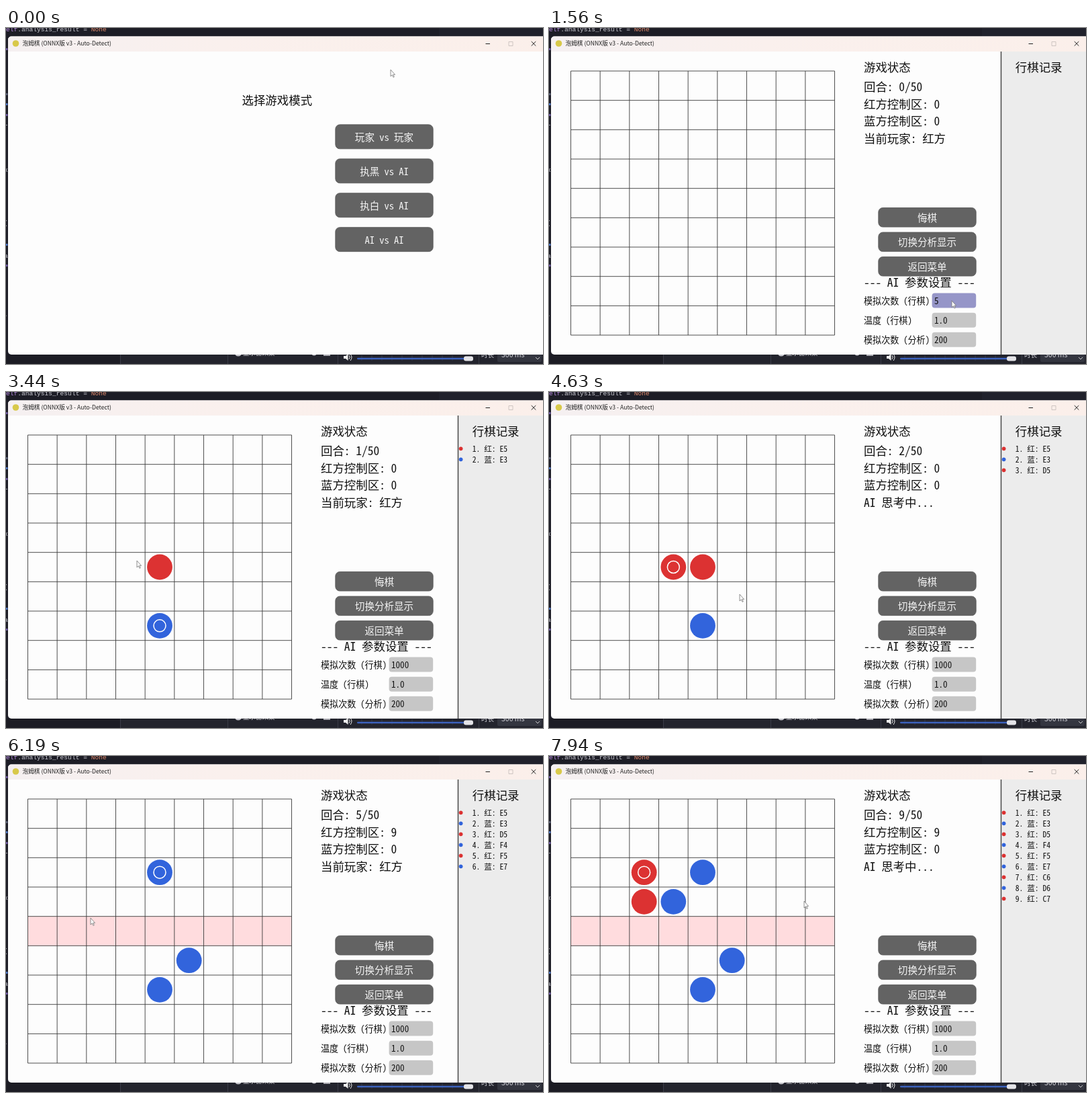
An HTML page for the animation above (8000 ms loop, 800 px wide and 500 px high).

```html
<!DOCTYPE html>
<html lang="zh-CN">
<head>
<meta charset="utf-8">
<style>
  html, body { margin: 0; width: 100%; height: 100%; overflow: hidden; background: #1c1c24; }
  svg { display: block; width: 800px; height: 500px; }
  text { font-family: "Noto Sans Mono CJK SC", "Noto Sans CJK SC", monospace; white-space: pre; }
  .ui { font-family: "Noto Sans CJK SC", "Noto Sans", sans-serif; }
  .code { font-family: "Liberation Mono", monospace; }
</style>
</head>
<body>
<svg id="stage" viewBox="0 0 800 500">
  <defs>
    <linearGradient id="bar"><stop stop-color="#f5f0f1"/><stop offset=".4" stop-color="#faf0ed"/><stop offset="1" stop-color="#fbefea"/></linearGradient>
    <clipPath id="win"><rect x="3" y="12.5" width="820" height="473.5" rx="5"/></clipPath>
  </defs>
  <g id="desktop"></g>
  <g clip-path="url(#win)">
    <rect x="3" y="12" width="800" height="475" fill="#fdfdfd"/>
    <rect x="3" y="12" width="800" height="23" fill="url(#bar)"/>
    <g id="caption"></g>
    <g id="menu"></g>
    <g id="game"><g id="fixed"></g><g id="live"></g></g>
  </g>
  <path id="cursor" d="M0 0V10L2.3 7.9L4 11.4L5.4 10.7L3.8 7.4H6.6Z" fill="#fbfbfb" stroke="#777" stroke-width=".8"/>
</svg>
<script>
const LOOP = 8000, CELL = 43.67, LEFT = 32.5, TOP = 64;
const RED = '#dc3232', BLUE = '#3264dc';
const $ = id => document.getElementById(id);

const rect = (x, y, w, h, fill, rx = 0, extra = '') =>
  `<rect x="${x}" y="${y}" width="${w}" height="${h}" rx="${rx}" fill="${fill}" ${extra}/>`;
const circle = (x, y, r, fill, extra = '') =>
  `<circle cx="${x}" cy="${y}" r="${r}" fill="${fill}" ${extra}/>`;
const path = (d, stroke, w = 1) => `<path d="${d}" fill="none" stroke="${stroke}" stroke-width="${w}"/>`;
// y is the vertical middle of the line
const text = (s, x, y, size, fill = '#111', extra = '') =>
  `<text x="${x}" y="${y + size * .37}" font-size="${size}" fill="${fill}" ${extra}>${s}</text>`;
const button = (s, y, h) =>
  rect(490.8, y, 145.4, h, '#636363', 6.5, 'stroke="#565656" stroke-width=".8"') +
  text(s, 563.5, y + h / 2 + .8, 14.55, '#f4f4f4', 'text-anchor="middle"');

function drawDesktop() {
  const ui = 'class="ui"', code = 'class="code"';
  let s = rect(0, 0, 800, 500, '#1d1d26') + rect(645, 0, 155, 13, '#20212b') +
    rect(0, 486, 800, 14, '#23242d') + rect(0, 486, 170, 14, '#1c1c24') +
    text('<tspan fill="#b78be0">elf</tspan>.analysis_result = <tspan fill="#e08a6c">None</tspan>', 0, 1.2, 9.6, '#c8c8d0', code);
  for (const [y, c] of [[30, '#6b559e'], [97, '#555a70'], [112, '#4a72c0'], [128, '#6b559e'], [321, '#4a72c0'], [352, '#6b559e']])
    s += rect(0, y, 2.5, 3, c);
  for (const [ch, y] of [['r', 145], ['x', 210], ['(', 289], ['a', 338], ['.', 425]])
    s += text(ch, -3, y, 9.6, '#c8c8d0', code);
  for (const x of [170.5, 330.5, 494.5, 704.5]) s += path(`M${x} 486V500`, '#3a3c48');
  s += circle(346, 483, 5.5, '#c9c9cf') + text('显示器采集', 353, 483, 9.5, '#c9c9cf', ui) +
    circle(459, 484, 3.5, '#c9c9cf') + rect(473, 484, 10, 4, '#a9a9b0') +
    `<path d="M503 488h3l3.5-3v10l-3.5-3h-3Z" fill="#eee"/>` +
    path('M511 487q2.5 3 0 6M513 485q4 5 0 10', '#eee');
  for (let x = 530; x < 680; x += 15) s += path(`M${x} 487V495`, '#343f5e', .7);
  return s + rect(523, 490.7, 162, 2.6, '#3c62bd', 1.3) + rect(682, 488.5, 14, 7, '#e4e4e8', 3) +
    text('时长', 708, 486.5, 9.5, '#d4d4da', ui) + rect(732, 480, 66, 17, '#343640', 2) +
    text('300 ms', 738, 486.5, 10.5, '#d4d4da', ui) + path('M789 490l3 3l3-3', '#ccc');
}

const drawCaption = () =>
  circle(14.5, 23, 4.8, '#d8c94a') +
  text('泡姆棋 (ONNX版 v3 - Auto-Detect)', 24.5, 23.2, 8.66, '#222', 'class="ui"') +
  path('M714.5 23.5H721', '#222') + path('M749 20.5h6v6h-6Z', '#c9c1be', .9) +
  path('M782.7 20l6.6 6.6M789.3 20l-6.6 6.6', '#222');

const drawMenu = () =>
  text('选择游戏模式', 351.5, 108, 17.45) +
  ['玩家 vs 玩家', '执黑 vs AI', '执白 vs AI', 'AI vs AI']
    .map((s, i) => button(s, 143.8 + i * 50.95, 36)).join('');

function drawFixed() {
  let s = rect(674, 35, 130, 460, '#ececec') + path('M673.5 35V486', '#484848', 1.5);
  s += text('游戏状态', 469, 58.5, 17.45) + text('行棋记录', 694.8, 58.5, 17.45);
  ['悔棋', '切换分析显示', '返回菜单'].forEach((t, i) => s += button(t, 267.5 + i * 36.5, 28.6));
  s += text('--- AI 参数设置 ---', 469, 378.8, 17.45);
  ['模拟次数 (行棋)', '温度 (行棋)', '模拟次数 (分析)'].forEach((t, i) => s += text(t, 469, 405.7 + i * 29.1, 13.1));
  return s;
}

// [time, square, turn counter]
const MOVES = [
  [2950, 'E5', 0], [3300, 'E3', 1], [4250, 'D5', 2], [4880, 'F4', 3], [5300, 'F5', 4],
  [5640, 'E7', 5], [6760, 'C6', 7], [7200, 'D6', 8], [7640, 'C7', 9]
];
const CAPTURE = 5;                       // this move fills row 5
const START = 520, FOCUS = [1150, 2850];
const TYPED = [[0, '500'], [1400, '50'], [1500, '5'], [1600, ''], [1900, '1'], [2030, '10'], [2160, '100'], [2290, '1000']];

function drawLive(t) {
  const played = MOVES.filter(m => m[0] <= t), n = played.length;
  const captured = n >= CAPTURE;
  let s = captured ? rect(LEFT, TOP + 4 * CELL, 9 * CELL, CELL, '#ffdcde') : '';
  let grid = '';
  for (let i = 0; i < 10; i++) {
    const x = LEFT + i * CELL, y = TOP + i * CELL, span = 9 * CELL;
    grid += `M${x} ${TOP}v${span}M${LEFT} ${y}h${span}`;
  }
  s += path(grid, '#3c3c3c', .9);
  played.forEach(([, sq], i) => {
    const col = sq.charCodeAt(0) - 65, row = 9 - sq[1], color = i % 2 ? BLUE : RED;
    const x = LEFT + (col + .5) * CELL, y = TOP + (row + .5) * CELL;
    if (!(captured && row === 4)) {
      s += circle(x, y, 18.9, color);
      if (i === n - 1) s += circle(x, y, 9, 'none', 'stroke="#fff" stroke-width="1.5"');
    }
    const ly = 84.3 + i * 16;
    s += circle(677.6, ly, 2.9, color) + text(`${i + 1}. ${i % 2 ? '蓝' : '红'}: ${sq}`, 694.8, ly + .4, 11.64);
  });
  const turn = n ? played[n - 1][2] : 0;
  [`回合: ${turn}/50`, `红方控制区: ${captured ? 9 : 0}`, '蓝方控制区: 0', n % 2 ? 'AI 思考中...' : '当前玩家: 红方']
    .forEach((line, i) => s += text(line, 469, 87.8 + i * 25.5, 17.45));
  const sims = TYPED.filter(k => k[0] <= t).pop()[1];
  [sims, '1.0', '200'].forEach((v, i) => {
    const on = !i && t >= FOCUS[0] && t < FOCUS[1], y = 394.6 + i * 29.1;
    s += rect(570.6, y, 65.6, 22, on ? '#9696c8' : '#c6c6c6', 4) + text(v, 574, y + 11.2, 13.1);
  });
  return s;
}

// cursor stops: [time, x, y]
const PATH = [
  [0, 573, 62], [400, 582, 205], [540, 583, 209], [630, 594, 210], [1080, 600, 404], [1700, 600, 406],
  [2300, 584, 402], [2500, 561, 386], [2860, 232, 258], [3150, 228, 258], [3440, 195, 251],
  [3800, 184, 258], [4300, 184, 260], [4630, 284, 301], [4950, 290, 285], [5230, 272, 260],
  [5400, 268, 259], [5800, 180, 250], [6190, 126, 241], [6450, 110, 232], [6700, 140, 216],
  [7150, 144, 208], [7500, 140, 174], [7680, 146, 174], [7940, 380, 216], [8000, 392, 218]
];
function cursorAt(t) {
  const i = PATH.findIndex(p => p[0] > t), [t0, x0, y0] = PATH[i - 1], [t1, x1, y1] = PATH[i];
  const u = (t - t0) / (t1 - t0), e = u * u * (3 - 2 * u);
  return [x0 + (x1 - x0) * e, y0 + (y1 - y0) * e];
}

let shown = '';
function render(t) {
  const inGame = t >= START;
  $('menu').style.display = inGame ? 'none' : '';
  $('game').style.display = inGame ? '' : 'none';
  const next = drawLive(t);
  if (next !== shown) $('live').innerHTML = shown = next;
  $('cursor').setAttribute('transform', `translate(${cursorAt(t)})`);
}

$('desktop').innerHTML = drawDesktop();
$('caption').innerHTML = drawCaption();
$('menu').innerHTML = drawMenu();
$('fixed').innerHTML = drawFixed();
const begin = performance.now();
function frame() {
  render((performance.now() - begin) % LOOP);
  requestAnimationFrame(frame);
}
frame();
</script>
</body>
</html>
```
